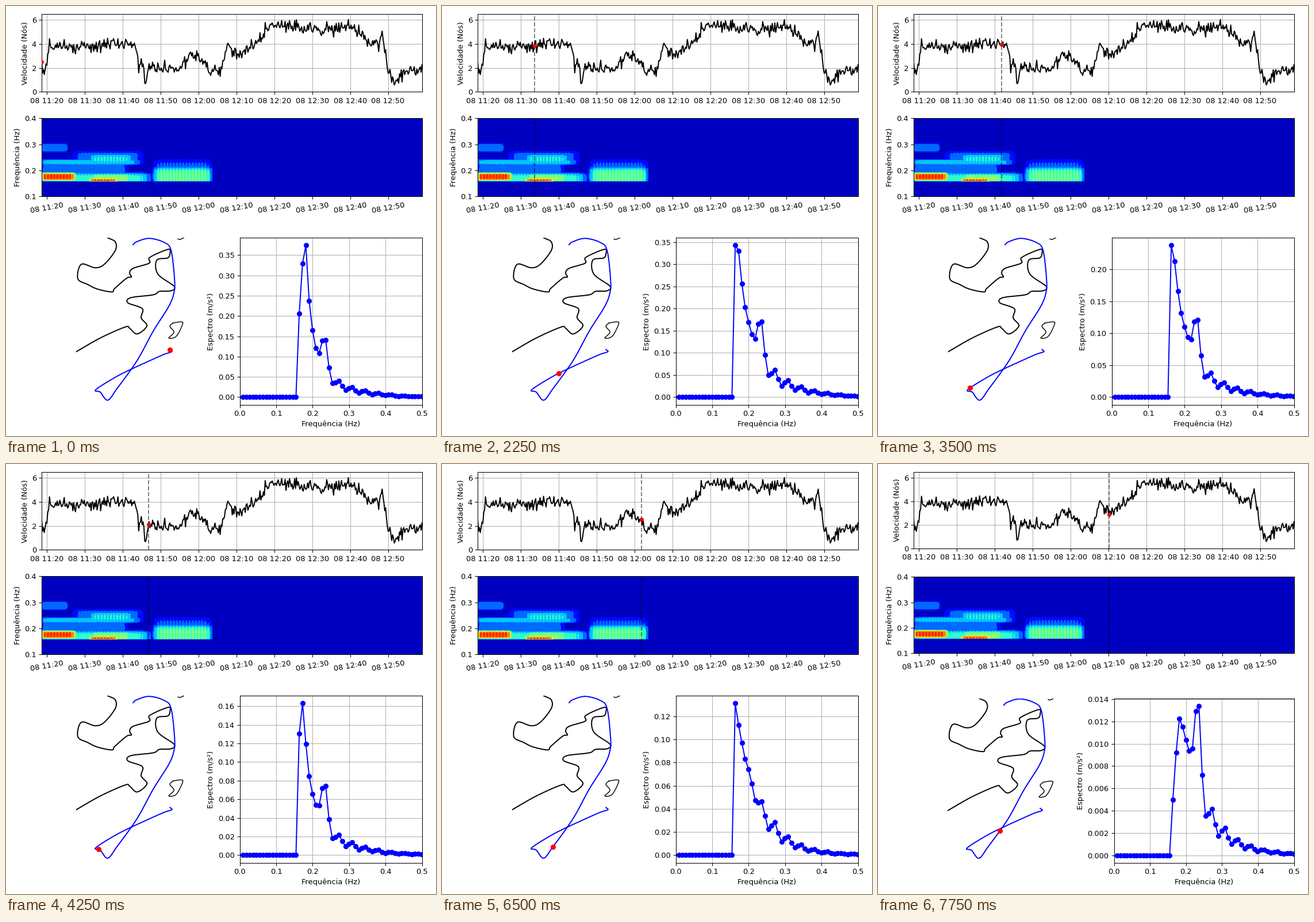
These frames come from a looping animation (748 by 748 pixels, 8000 ms). A matplotlib script:

```python
import numpy as np
import matplotlib.pyplot as plt
from matplotlib.animation import FuncAnimation

FRAMES, INTERVAL = 32, 250
X0, X1 = 63, 724            # span of the time axes
CURSOR_STEP = 10.94
STOPS = [0, 5, 12, 17, 22, 26, 31]


def speed_series(t):
    """Mean level through a few points, plus jitter that rests at cursor stops."""
    level = [(63, 2.5), (67, 1.5), (76, 3.8), (118, 3.7), (194, 4.1), (225, 3.9),
             (231, 2.2), (237, 2.7), (243, 0.9), (249, 1.9), (304, 2.0),
             (322, 3.0), (347, 2.4), (358, 1.6), (376, 1.9), (386, 4.1),
             (402, 3.1), (447, 4.4), (452, 5.3), (486, 5.5), (555, 5.2),
             (600, 5.4), (622, 4.9), (628, 4.0), (650, 4.0), (655, 5.0),
             (664, 2.0), (676, 0.4), (690, 1.5), (724, 2.0)]
    jitter = np.clip(np.random.default_rng(3).normal(0, 0.33, t.size), -0.7, 0.7)
    calm = np.abs(np.sin(np.pi * (t - X0) / CURSOR_STEP)) ** 0.25
    return np.clip(np.interp(t, *zip(*level)) + jitter * calm, 0, 6.2)


def spectrogram():
    """Soft-edged patches in colour-band units, rippled along time."""
    patches = [  # time, half-width, frequency, half-height, level
        (85, 24, .287, .018, 2.7),
        (136, 78, .200, .036, 2.8),
        (145, 92, .231, .011, 3.5),
        (183, 38, .243, .021, 3.9),
        (178, 62, .250, .025, 2.3),
        (155, 100, .168, .023, 4.3),
        (183, 36, .168, .020, 5.7),
        (92, 31, .175, .016, 9.2),
        (170, 26, .160, .009, 8.6),
        (308, 52, .176, .039, 4.9),
        (308, 52, .200, .043, 2.2),
    ]
    t = np.linspace(X0, X1, 662)
    f = np.linspace(0.1, 0.4, 181)[:, None]
    z = np.zeros((f.size, t.size))
    for tc, tw, fc, fw, level in patches:
        z = np.maximum(z, level * np.exp(-((t - tc) / tw) ** 12
                                         - ((f - fc) / fw) ** 4))
    depth = np.where(t > 257, 0.14, 0.06)
    z *= 1 + depth * np.cos(2 * np.pi * (t - X0) / (CURSOR_STEP / 2))
    z *= (f > 0.158) & (t < 360)
    return t, f.ravel(), z


# how the spectrum's shape develops from stop to stop
PEAK = [.374, .417, .287, .163, .215, .131, .0134]
CENTRE = [.181, .177, .163, .174, .163, .163, .185]
DECAY = [.015, .012, .030, .016, .040, .055, .050]
TAIL = [.25, .45, .45, .35, .25, .25, .50]
BUMP = [.20, .15, .25, .25, 0, 0, .55]
freq = 0.00907 * np.arange(1, 56)


def spectrum(frame):
    peak, centre, decay, tail, bump = (
        np.interp(frame, STOPS, key) for key in (PEAK, CENTRE, DECAY, TAIL, BUMP))
    d = np.maximum(freq - centre, 0)
    rise = np.exp(-0.5 * (np.minimum(freq - centre, 0) / 0.016) ** 2)
    s = rise * ((1 - tail) * np.exp(-d / decay) + tail * np.exp(-d / 0.08))
    s += bump * np.exp(-0.5 * ((freq - 0.23) / 0.01) ** 2)
    ripple = 0.3 * np.clip((freq - 0.19) / 0.08, 0, 1)
    s *= 1 + ripple * np.cos(2 * np.pi * (freq - 0.272) / 0.036)
    s[freq < 0.16] = 0
    return peak * s / s.max()


# map outlines, y pointing down
TRACK = [(286, 597), (289, 601), (272, 607), (217, 632), (188, 647), (157, 667),
         (165, 671), (178, 685), (194, 665), (219, 631), (235, 606), (257, 565),
         (284, 522), (293, 498), (294, 475), (288, 425), (276, 411), (250, 404),
         (228, 410), (222, 415)]
COAST = [(178, 403), (191, 410), (191, 425), (172, 449), (156, 455), (132, 449),
         (126, 474), (143, 484), (160, 492), (185, 497), (190, 491), (211, 473),
         (219, 471), (216, 464), (222, 456), (250, 447), (251, 437), (283, 423),
         (286, 430), (282, 438), (263, 442), (265, 466), (293, 487), (288, 495),
         (268, 496), (257, 502), (218, 507), (213, 516), (238, 526), (236, 542),
         (246, 556), (229, 570), (216, 560), (208, 558), (165, 577), (123, 601)]
ISLAND = [(291, 551), (305, 549), (308, 553), (297, 574), (284, 577),
          (293, 567), (286, 557), (291, 551)]
ISLET = [(300, 405), (303, 406), (310, 403)]
BOAT = [0, 2.41, 4.15, 5.75, 7.1, 8, 8.83]      # place along TRACK at each stop


def along(points, u):
    """Catmull-Rom curve through the points; u counts points."""
    p = np.array(points, float)
    p = np.vstack([2 * p[0] - p[1], p, 2 * p[-1] - p[-2]])
    u = np.atleast_1d(u)
    i = np.clip(u.astype(int), 0, len(points) - 2)
    t = (u - i)[:, None]
    a, b, c, d = p[i], p[i + 1], p[i + 2], p[i + 3]
    return (b + 0.5 * t * (c - a + t * (2 * a - 5 * b + 4 * c - d
                                        + t * (3 * (b - c) + d - a)))).T


def outline(points, color, width):
    u = np.linspace(0, len(points) - 1, 12 * len(points))
    ax_map.plot(*along(points, u), color=color, lw=width)


fig = plt.figure(figsize=(8, 8), dpi=93.5, facecolor="white")
ax_speed = fig.add_subplot(4, 1, 1)
ax_gram = fig.add_subplot(4, 1, 2)
ax_map = fig.add_subplot(2, 2, 3)
ax_spec = fig.add_subplot(2, 2, 4)

ticks = 72.1 + 65.87 * np.arange(10)
labels = [f"08 {11 + m // 60}:{m % 60:02d}" for m in range(20, 120, 10)]

time = np.linspace(X0, X1, 440)
speed = speed_series(time)
ax_speed.plot(time, speed, "k-", lw=1.5)
ax_speed.set(xlim=(X0, X1), ylim=(0, 6.5), yticks=[0, 2, 4, 6],
             ylabel="Velocidade (Nós)")
ax_speed.set_xticks(ticks, labels)
ax_speed.grid(True)

ax_gram.set_facecolor("#0000c0")
ax_gram.contourf(*spectrogram(), levels=np.arange(1, 12), cmap="jet",
                 vmin=0, vmax=11)
ax_gram.set(xlim=(X0, X1), ylim=(0.1, 0.4), yticks=[0.1, 0.2, 0.3, 0.4],
            ylabel="Frequência (Hz)")
ax_gram.set_xticks(ticks, labels, rotation=10)

outline(COAST, "black", 1.5)
outline(ISLAND, "black", 1.1)
outline(ISLET, "black", 1.1)
outline(TRACK, "blue", 1.5)
ax_map.set(xlim=(123, 320), ylim=(693, 403))
ax_map.set_aspect("equal")
ax_map.axis("off")

ax_spec.set(xlim=(0, 0.5), xlabel="Frequência (Hz)", ylabel="Espectro (m/s²)")
ax_spec.grid(True)

cursors = [ax.axvline(X0, color="k", ls="--", lw=1.5, alpha=0.5)
           for ax in (ax_speed, ax_gram)]
speed_dot, = ax_speed.plot([], [], "ro", ms=4.4, zorder=5)
boat, = ax_map.plot([], [], "ro", ms=6, zorder=5)
curve, = ax_spec.plot([], [], "bo-", lw=1.5, ms=6)


def relayout():
    """Start from the default margins so each layout depends only on its labels."""
    fig.subplots_adjust(left=0.125, right=0.9, bottom=0.11, top=0.88,
                        wspace=0.2, hspace=0.2)
    fig.tight_layout()


def draw(frame):
    x = X0 + CURSOR_STEP * frame
    for line in cursors:
        line.set_xdata([x, x])
        line.set_visible(frame > 0)
    speed_dot.set_data([x], [np.interp(x, time, speed)])
    boat.set_data(*along(TRACK, np.interp(frame, STOPS, BOAT)))

    values = spectrum(frame)
    curve.set_data(freq, values)
    ax_spec.set_ylim(-0.05 * values.max(), 1.05 * values.max())
    relayout()
    return [*cursors, speed_dot, boat, curve]


anim = FuncAnimation(fig, draw, frames=FRAMES, interval=INTERVAL,
                     repeat=True, blit=False)
plt.show()
```
